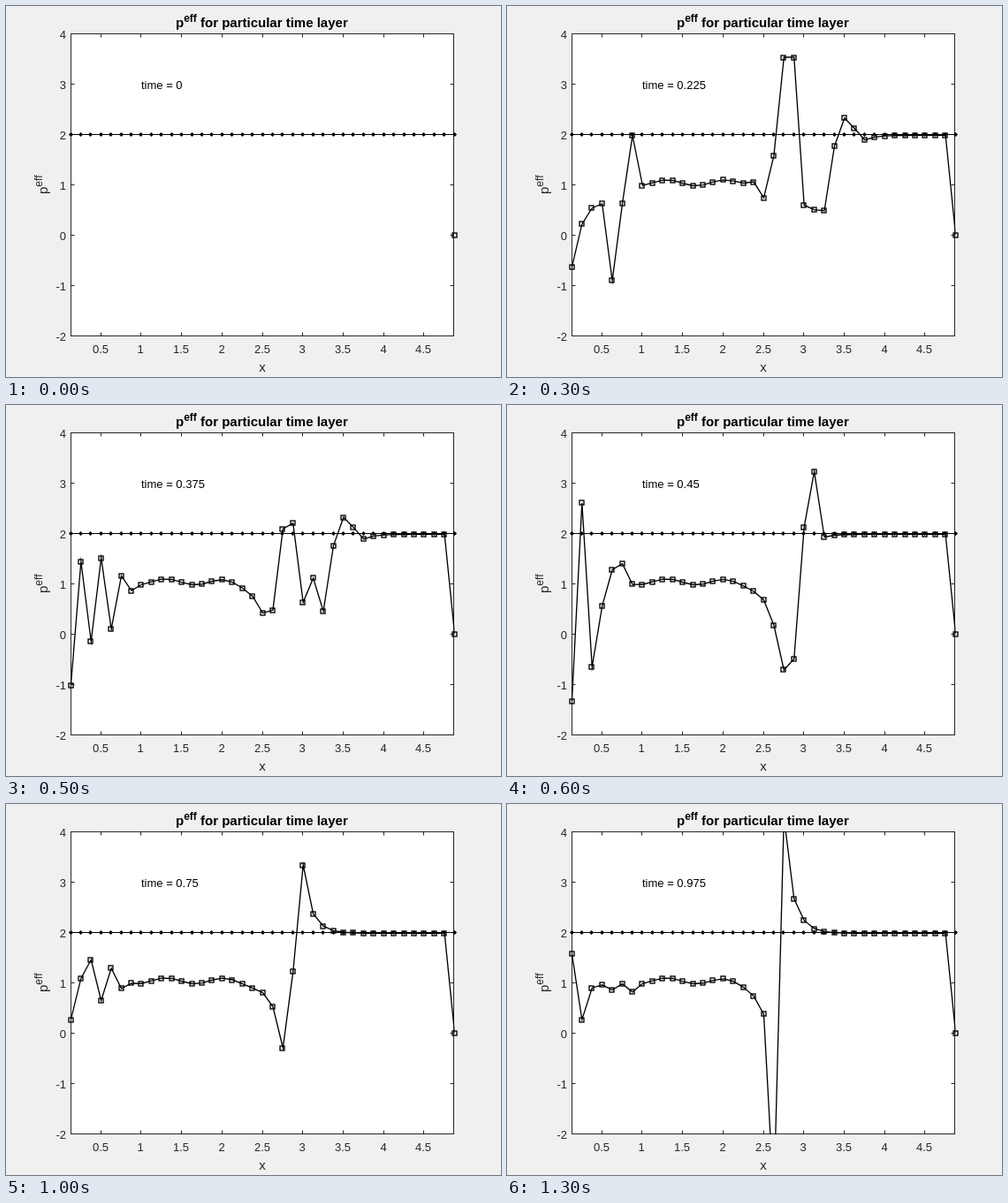
An HTML page with a canvas for the animation above (1400 ms loop, 560 px wide and 420 px high).

```html
<!DOCTYPE html>
<html lang="en">
<head>
<meta charset="utf-8">
<title>Pressure plot</title>
<style>
html, body { margin: 0; width: 100%; height: 100%; overflow: hidden; background: #f0f0f0; }
canvas { display: block; }
</style>
</head>
<body>
<canvas id="plot" width="560" height="420"></canvas>
<script>
const ctx = document.getElementById('plot').getContext('2d');
const FONT = '"Liberation Sans", Arial, sans-serif';
const L = 73.5, R = 506.5, T = 31.5, B = 373.5;
const LAST = 38, REST = 1.985, STEP_MS = 100, STEPS = 14;
const px = i => 73 + i * 11.425;
const py = v => T + (4 - v) * 57;
const snap = n => Math.floor(n) + .5;
const mix = (a, b, f) => a + (b - a) * f;

const plateau = i => 1.04 + .06 * Math.sin(1.1 * (i - 8));

// A wave: a ringing left edge, a rippled plateau and a steep front.
// Both sides of the front fade out geometrically.
function wave(edge, start, front) {
  const end = start + front.length - 1;
  return Array.from({ length: LAST + 1 }, (_, i) => {
    if (i === LAST) return 0;
    if (i < edge.length) return edge[i];
    if (i > end) return mix(REST, front[front.length - 1], .37 ** (i - end));
    if (i >= start) return front[i - start];
    return mix(plateau(i), front[0], .4 ** (start - i));
  });
}

const waves = {
  2: wave([-.59, .17, .71, -1.22, -.73, .34, 3.22], 18, [1.47, 1.33, 2.38, 2.17, 2.17]),
  4: wave([-.68, .27, .37, 2.47, -1.07, .92, .74], 19,
    [.16, .78, 4.9, 4.9, -.86, -1, -1.02, 1.55, 2.67, 2.25, 1.8]),
  6: wave([-1.34, 2.61, -.65, .56, 1.28, 1.4], 20, [.18, -.71, -.49, 2.13, 3.23, 1.93]),
  8: wave([5.75, .1, .38, 1.16, .41, .95], 21, [-.09, -2.55, 1.73, 3.48, 2.18]),
  10: wave([.27, 1.09, 1.46, .65, 1.29, .89], 21, [-.29, 1.22, 3.34, 2.37]),
  13: wave([1.58, .27, .9, .96, .86, .98, .82], 19, [.38, -3.3, 4.29, 2.67])
};
const marks = Object.keys(waves).map(Number);

function curve(step) {
  if (step === 0) return [];
  if (step === 1) {
    // the young wave is a narrower copy of the next one
    return waves[2].map((v, i) =>
      i === LAST ? v : waves[2][Math.min(LAST - 1, Math.round(i * 1.5))]);
  }
  const b = marks.find(k => k >= step);
  if (b === step) return waves[b];
  const a = marks[marks.indexOf(b) - 1];
  return waves[a].map((v, i) => mix(v, waves[b][i], (step - a) / (b - a)));
}

function text(str, x, y, size, align = 'left', color = '#262626', weight = '') {
  ctx.font = `${weight} ${size}px ${FONT}`;
  ctx.textAlign = align;
  ctx.fillStyle = color;
  ctx.fillText(str, x, y);
  return ctx.measureText(str).width;
}

function line(...p) {
  ctx.beginPath();
  for (let i = 0; i < p.length; i += 2) ctx.lineTo(p[i], p[i + 1]);
  ctx.stroke();
}

function axes() {
  ctx.fillStyle = '#f0f0f0';
  ctx.fillRect(0, 0, 560, 420);
  ctx.fillStyle = '#fff';
  ctx.fillRect(L, T, R - L, B - T);
  ctx.strokeStyle = '#262626';
  ctx.lineWidth = 1;
  ctx.strokeRect(L, T, R - L, B - T);
  for (let v = -2; v <= 4; v++) {
    const y = py(v);
    line(L, y, L + 4, y);
    line(R, y, R - 4, y);
    text(v, 68, y + 5.5, 13, 'right');
  }
  for (let v = .5; v < 4.8; v += .5) {
    const x = snap(px(v * 8 - 1));
    line(x, B, x, B - 4);
    line(x, T, x, T + 4);
    text(v, x - .5, 393, 13, 'center');
  }
  let x = 192;
  x += text('p', x, 24, 15, 'left', '#000', 'bold');
  x += text('eff', x, 18, 12, 'left', '#000', 'bold');
  text(' for particular time layer', x, 24, 15, 'left', '#000', 'bold');
  text('x', 290, 414, 15, 'center');
  ctx.save();
  ctx.translate(47, 213);
  ctx.rotate(-Math.PI / 2);
  text('eff', text('p', 0, 0, 15), -6, 12);
  ctx.restore();
}

function diamond(x, y, r) {
  ctx.beginPath();
  ctx.moveTo(x - r, y);
  ctx.lineTo(x, y - r);
  ctx.lineTo(x + r, y);
  ctx.lineTo(x, y + r);
  ctx.fill();
}

function draw(step) {
  axes();
  text('time = ' + +(step * .075).toFixed(3), 153, 94, 13, 'left', '#000');
  ctx.strokeStyle = ctx.fillStyle = '#000';
  line(L, py(2), R, py(2));
  for (let i = 0; i <= LAST; i++) diamond(snap(px(i)), py(2), 2.6);

  const vs = curve(step).slice();
  ctx.lineWidth = 1.35;
  ctx.save();
  ctx.beginPath();
  ctx.rect(L - .5, T - .5, R - L + 1.5, B - T + 1);
  ctx.clip();
  line(...vs.flatMap((v, i) => [px(i) + .4, py(v)]));
  ctx.restore();
  vs[LAST] = 0;
  vs.forEach((v, i) => {
    if (v >= -2 && v <= 4) ctx.strokeRect(snap(px(i)) - 2.5, snap(py(v)) - 2.5, 5, 5);
  });
}

function tick() {
  draw(Math.floor(performance.now() / STEP_MS) % STEPS);
  requestAnimationFrame(tick);
}
tick();
</script>
</body>
</html>
```
